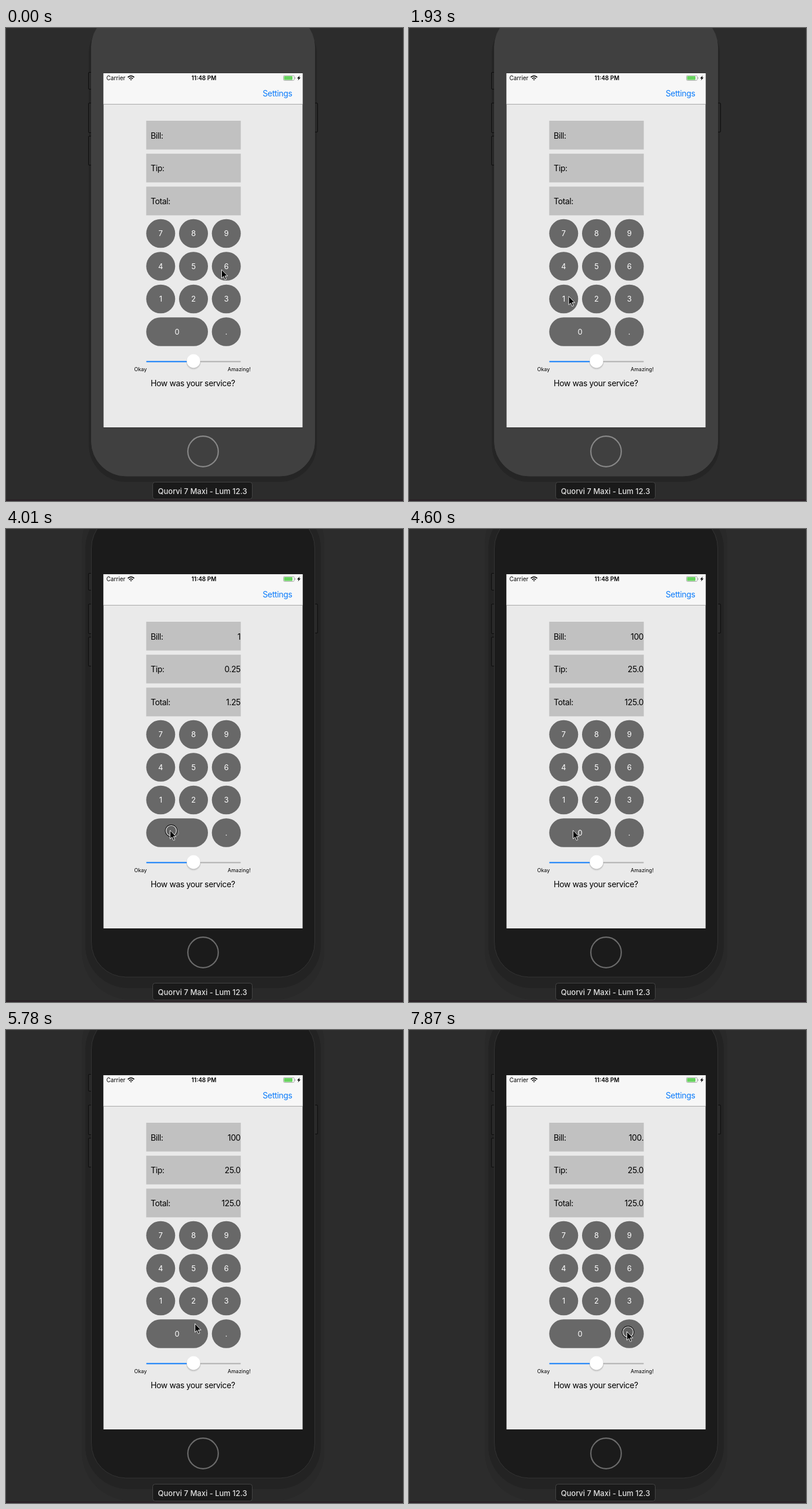
These frames come from a looping animation (686x816 px, 8 s). An HTML page:

```html
<!DOCTYPE html>
<html lang="en">
<head>
<meta charset="utf-8">
<title>Tip calculator</title>
<style>
  html, body { margin: 0; width: 100%; height: 100%; overflow: hidden; background: #2c2c2c; }
  svg { display: block; }
  text { font: 14px Inter, Roboto, sans-serif; letter-spacing: -.38px; fill: #000; }
  .key { font-size: 13px; letter-spacing: 0; fill: #fff; text-anchor: middle; }
  .small { font-size: 9px; letter-spacing: 0; }
  .status { font-size: 10px; letter-spacing: 0; }
  .end { text-anchor: end; }
  .mid { text-anchor: middle; }
  #body { fill: #404040; stroke: #404040; }
  #home { fill: none; stroke: #888; stroke-width: 2.2; }
  .active #body { fill: #1b1b1b; stroke: #343434; }
  .active #home { stroke: #6b6b6b; }
  .wide, .active .near { display: none; }
  .active .wide { display: inline; }
</style>
</head>
<body>
<svg id="stage" width="686" height="816" viewBox="0 0 686 816">
  <rect width="686" height="816" fill="#2c2c2c"/>
  <rect y="813" width="686" height="3" fill="#2a2227"/>
  <rect class="near" x="143" y="-20" width="394" height="803" rx="64" fill="#252525"/>
  <g class="wide">
    <rect x="131" y="-60" width="419" height="872" rx="84" fill="#292929"/>
    <rect x="137" y="-40" width="407" height="832" rx="74" fill="#232323"/>
  </g>
  <g fill="#282828" stroke="#0c0c0c">
    <rect x="142.5" y="76.500" width="8" height="29" rx="1.500"/>
    <rect x="142.5" y="129.500" width="8" height="51" rx="1.500"/>
    <rect x="142.5" y="186.500" width="8" height="50" rx="1.500"/>
    <rect x="530.5" y="129.500" width="8" height="50" rx="1.500"/>
  </g>
  <rect id="body" x="147.500" y="-27" width="386" height="800" rx="60"/>
  <circle id="home" cx="340.500" cy="730.500" r="26.300"/>

  <rect x="168" y="77.500" width="345" height="612" fill="#222"/>
  <rect x="168.500" y="78" width="344" height="611" fill="#eaeaea"/>
  <rect x="168.500" y="78" width="344" height="53" fill="#f7f7f7"/>
  <rect x="168.500" y="131" width="344" height="1" fill="#a6a6a6"/>
  <text class="status" x="173.500" y="90">Carrier</text>
  <text class="status mid" x="342" y="90" font-weight="600" style="font-weight:600">11:48 PM</text>
  <g fill="none" stroke="#000" stroke-width="1.700">
    <path d="M210.500 85q5.500-4.600 11 0M212.700 87.300q3.300-2.600 6.600 0"/>
    <path d="M214.200 88.500h3.600l-1.800 2z" fill="#000" stroke="none"/>
  </g>
  <rect x="479.500" y="82" width="18.500" height="8.500" rx="1.800" fill="#f7f7f7" stroke="#999" stroke-width=".8"/>
  <rect x="480.500" y="83" width="14.500" height="6.500" rx="1" fill="#67d35e"/>
  <path d="M499.300 84.800v3" stroke="#999"/>
  <path d="M507.500 82l-4.500 5h2.500l-1 3.500 4.500-5h-2.500z"/>
  <text x="443.500" y="118" style="fill:#0a7bfb">Settings</text>

  <g id="fields"></g>
  <g id="keys"></g>

  <path d="M324 575.500H405.500" stroke="#b0b0b0" stroke-width="2"/>
  <path d="M242.500 575.500H324" stroke="#0a7bfb" stroke-width="2"/>
  <circle cx="324" cy="577" r="12.500" fill="#000" opacity=".07"/>
  <circle cx="324" cy="575.500" r="12.300" fill="#000" opacity=".09"/>
  <circle cx="324" cy="574.500" r="11.700" fill="#fff"/>
  <text class="small" x="221.500" y="591.500">Okay</text>
  <text class="small" x="383" y="591.500">Amazing!</text>
  <text x="250" y="617.500">How was your service?</text>

  <rect x="253.500" y="783.500" width="172" height="29" rx="4" fill="#1a1a1a" stroke="#444"/>
  <text class="mid" x="339.500" y="804" style="font-size:13px;font-weight:500;letter-spacing:0;fill:#e2e2e2">Quorvi 7 Maxi - Lum 12.3</text>

  <g id="cursor">
    <g id="touch" fill="none">
      <circle cx="2.500" cy="1.500" r="10" fill="#606060" fill-opacity=".75" stroke="#111" stroke-width="1.500"/>
      <circle cx="2.500" cy="1.500" r="9" stroke="#eee" stroke-width="1.200"/>
    </g>
    <path d="M.5.800V15.600L3.900 12.500 6.300 18.200 8.700 17.200 6.300 11.700H11z" fill="#000" stroke="#eee"/>
  </g>
</svg>
<script>
const $ = id => document.getElementById(id);
const LOOP = 8000, ACTIVE_AT = 3130;

$("fields").innerHTML = ["Bill:", "Tip:", "Total:"].map((label, i) => {
  const y = 160 + i * 56.8;
  return `<rect x="242.300" y="${y}" width="163.400" height="49.600" fill="#c1c1c1"/>
    <text x="250" y="${y + 30.5}">${label}</text>
    <text class="end value" x="405.300" y="${y + 30.5}"></text>`;
}).join("");

$("keys").innerHTML = [..."789456123", "0", "."].map((key, i) => {
  const zero = key === "0";
  const column = key === "." ? 2 : i % 3;
  const x = 242.3 + column * 56.7, y = 329.7 + Math.floor(Math.min(i, 9) / 3) * 56.5;
  const width = zero ? 106.7 : 50;
  return `<rect x="${x}" y="${y}" width="${width}" height="49.600" rx="24.800" fill="#686868"/>
    <text class="key" data-key="${key}" x="${x + width / 2}" y="${y + 29.5}">${key}</text>`;
}).join("");

const values = [...document.querySelectorAll(".value")];
const labels = [...document.querySelectorAll(".key")];

// Cursor moves: start, last step, number of steps, destination
const moves = [
  [590, 1490, 7, 277, 464],
  [1640, 1640, 1, 276, 464],
  [1930, 1930, 1, 275.5, 462],
  [3430, 3870, 4, 283, 519],
  [4900, 5200, 3, 293, 504],
  [5340, 5340, 1, 301, 499],
  [5490, 6230, 6, 376, 519.5]
];

// Calculator states: start, pressed key, bill, tip, total
const states = [
  [0, "", "", "", ""],
  [3130, "1", "", "", ""],
  [3280, "", "1", "0.25", "1.25"],
  [4010, "0", "1", "0.25", "1.25"],
  [4160, "", "10", "2.5", "12.5"],
  [4450, "0", "10", "2.5", "12.5"],
  [4600, "", "100", "25.0", "125.0"],
  [7870, ".", "100.", "25.0", "125.0"]
];

function cursorAt(t) {
  let x = 372, y = 416;
  for (const [start, end, steps, toX, toY] of moves) {
    if (t < start) break;
    const interval = (end - start) / (steps - 1) || 1;
    const part = Math.min(steps, Math.floor((t - start) / interval + 1e-6) + 1) / steps;
    x += (toX - x) * part;
    y += (toY - y) * part;
  }
  return [x, y];
}

function draw(t) {
  const [, pressed, ...amounts] = states.findLast(state => t >= state[0]);
  $("stage").classList.toggle("active", t >= ACTIVE_AT);
  values.forEach((node, i) => node.textContent = amounts[i]);
  labels.forEach(node => node.style.opacity = node.dataset.key === pressed ? 0.2 : 1);
  $("touch").style.display = pressed ? "inline" : "none";
  $("cursor").setAttribute("transform", `translate(${cursorAt(t)})`);
}

const began = performance.now();
function tick() {
  draw((performance.now() - began) % LOOP);
  requestAnimationFrame(tick);
}
tick();
</script>
</body>
</html>
```
